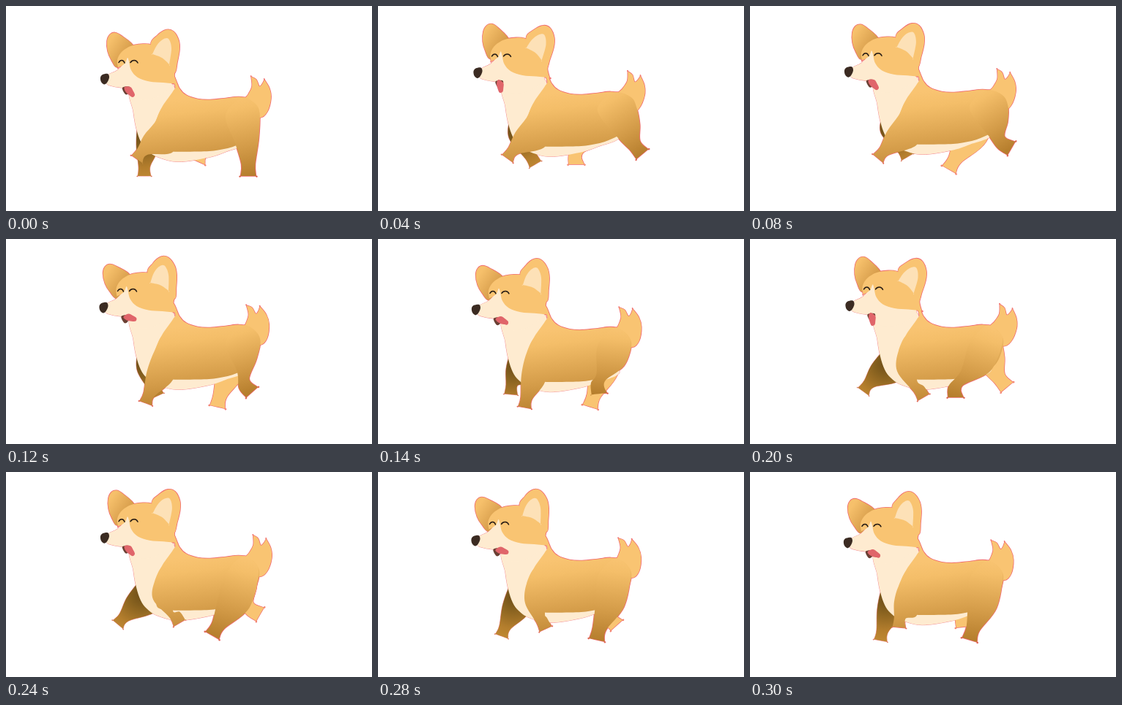
An HTML page with a canvas for the animation above (320 ms loop, 500 px wide and 281 px high).

```html
<!DOCTYPE html>
<html lang="en">
<head>
<meta charset="utf-8">
<title>Walking corgi</title>
<style>
  html, body { margin: 0; width: 100%; height: 100%; overflow: hidden; background: #fff; }
  canvas { display: block; }
</style>
</head>
<body>
<canvas id="stage" width="500" height="281"></canvas>
<script>
const ctx = document.getElementById('stage').getContext('2d');
const LOOP = 320, STEP = 20;
const ORANGE = '#f9c472', CREAM = '#feebd0', DARK = '#3b2b22', PINK = '#f0686f';
const FUR = [[0, ORANGE], [.18, '#f4be69'], [.65, '#d39b48'], [1, '#b67e2d']];

// Paw keys: time, sole centre x and y, shin angle in degrees (positive points back).
const FRONT_STEPS = [
  [0, 179, 210, -35], [40, 177, 209, -36], [80, 175, 209, -40], [120, 191, 225, -20],
  [160, 211, 233, 0], [200, 237, 217, 30], [240, 237, 207, 30], [280, 229, 215, 25]
];
const HIND_STEPS = [
  [0, 331, 233, 0], [40, 361, 203, 40], [80, 357, 195, 60], [120, 336, 210, 42],
  [160, 272, 213, -24], [200, 281, 217, 0], [240, 282, 224, -30],
  [280, 299, 230, -13], [300, 300, 230, -17]
];

// Rest outlines as x, y pairs; a doubled point makes a corner.
const TAIL = [325,131, 331,121, 336,110, 335,97, 335,97, 342,101, 346,110, 350,107,
  353,101, 353,101, 360,113, 362,127, 357,145, 347,153, 335,145];
const CHEST = [171,112, 174,145, 178,168, 184,186, 192,197, 206,206.5, 235,213.5,
  275,208, 300,200, 330,186, 300,160, 240,125, 222,105];
const BODY = [222,88, 230,97, 237,113, 246,122, 262,127.5, 279,128.5, 300,126.5, 318,124.5,
  332,128, 343,138, 346,152, 336,178, 315,191, 290,197.5, 262,199.5, 212,198, 205,184,
  203,170, 206,154, 214,137, 228,117, 231,109];
const EAR_FAR = [152,84, 144,74, 139,62, 138,48, 142,39, 149,36.5, 158,41, 174,55, 165,70];
const EAR_NEAR = [198,54, 207,40, 219,32.5, 229,35, 236,47, 237,60, 234,77, 230,92, 215,85];
const EAR_INNER = [200,66, 200,66, 206,54, 214,46, 222,45, 226,58, 223,80, 223,80, 213,71];
const FACE = [139,95, 152,88, 163,76, 167,69, 185,72, 210,95, 226,106, 214,120, 195,128,
  174,126, 171,113, 171,113, 158,112, 146,110, 137,106];
const CAP = [153,84.5, 153,84.5, 152,74, 157,64, 166,57, 175,53.5, 187,52, 199,53, 215,60,
  231,80, 230,95, 233,107, 233,107, 215,105, 196,103.5, 180,98, 171,88, 168,76, 166,71,
  163,78, 158,82];
const NOSE = [129,98, 132,94, 139,93, 141,98, 138,105, 134,107.5, 130,104];
const MOUTH = [159,112, 169,111, 168,119, 163,121];
const TONGUE = [162,111, 170,111, 174,117, 176,122, 173,125, 168,122, 163,117];

// Cyclic cubic interpolation through unevenly spaced keys.
function track(keys, time) {
  const t = time % LOOP, n = keys.length;
  const i = keys.findLastIndex(key => key[0] <= t);
  const [a, b, c, d] = [-1, 0, 1, 2].map(step => {
    const j = i + step, [at, ...values] = keys[(j + n) % n];
    return { at: at + Math.floor(j / n) * LOOP, values };
  });
  const span = c.at - b.at, u = (t - b.at) / span, u2 = u * u, u3 = u2 * u;
  return b.values.map((from, k) => {
    const to = c.values[k];
    const m0 = (to - a.values[k]) / (c.at - a.at) * span;
    const m1 = (d.values[k] - from) / (d.at - b.at) * span;
    return (2 * u3 - 3 * u2 + 1) * from + (u3 - 2 * u2 + u) * m0
         + (3 * u2 - 2 * u3) * to + (u3 - u2) * m1;
  });
}

function place(flat, dx, dy, angle = 0, px = 0, py = 0) {
  const c = Math.cos(angle), s = Math.sin(angle), out = [];
  for (let i = 0; i < flat.length; i += 2) {
    const x = flat[i] - px, y = flat[i + 1] - py;
    out.push(px + x * c - y * s + dx, py + x * s + y * c + dy);
  }
  return out;
}

function smooth(flat) {
  const path = new Path2D(), n = flat.length / 2;
  const at = i => { const k = (i + n) % n * 2; return [flat[k], flat[k + 1]]; };
  path.moveTo(...at(0));
  for (let i = 0; i < n; i++) {
    const [x0, y0] = at(i - 1), [x1, y1] = at(i), [x2, y2] = at(i + 1), [x3, y3] = at(i + 2);
    path.bezierCurveTo(x1 + (x2 - x0) / 6, y1 + (y2 - y0) / 6,
      x2 - (x3 - x1) / 6, y2 - (y3 - y1) / 6, x2, y2);
  }
  path.closePath();
  return path;
}

const between = (p, q, dx, dy) => [(p[0] + q[0]) / 2 + dx, (p[1] + q[1]) / 2 + dy];

// Sole and ankle corners of a paw seen from the side.
function paw([x, y, degrees], half, length) {
  const angle = degrees * Math.PI / 180, c = Math.cos(angle), s = Math.sin(angle);
  const corner = (along, up) => [x + along * c - up * s, y - along * s - up * c];
  return {
    toe: corner(-half, 0), heel: corner(half, 0),
    shin: corner(1 - half, length), calf: corner(half - 1, length)
  };
}

function frontLeg(time, by, shift = 0) {
  const { toe, heel, shin, calf } = paw(track(FRONT_STEPS, time), 9, 13);
  const shoulder = [203, 160 + by];
  const knee = between(shoulder, shin, -3 - Math.max(0, shin[0] - 205) / 2, 0);
  const outline = [[216, 139 + by], shoulder, knee, shin, toe, toe, heel, heel, calf,
    [228, 200 + by], [232, 168 + by]];
  return smooth(place(outline.flat(), shift, 0));
}

function hindLeg(time, by, shift = 0) {
  const foot = track(HIND_STEPS, time), x = foot[0];
  const { toe, heel, shin, calf } = paw(foot, 10.5, 16);
  const reach = Math.max(0, 331 - x);
  const rump = [345 + Math.max(0, x - 325) * .24, 146 + by * .8];
  const thigh = between(rump, calf, 2 + reach * .18, reach * .2);
  const groin = [313 + (x - 331) / 2, 188 + by];
  const outline = [[300, 150 + by], [322, 126 + by], [rump[0] - 8, 132 + by], rump, thigh,
    calf, heel, heel, toe, toe, shin, groin];
  return smooth(place(outline.flat(), shift, 0));
}

function shade(gradient, stops) {
  for (const [at, color] of stops) gradient.addColorStop(at, color);
  return gradient;
}

function draw(time) {
  const p = time % (LOOP / 2) / (LOOP / 2), opposite = time + LOOP / 2;
  const by = -10 * Math.sin(Math.PI * p);
  const hx = 1.5 * Math.sin(2 * Math.PI * p);
  const hy = -10 * Math.sin(Math.PI * p ** .8);
  const sway = .14 * Math.sin(2 * Math.PI * p ** 1.2);
  const lick = .58 * Math.sin(2 * Math.PI * p);

  const head = flat => smooth(place(flat, hx, hy));
  const ear = (flat, px, py) => smooth(place(flat, hx, hy, sway, px, py));

  const [footX, footY] = track(HIND_STEPS, time);
  const coat = shade(ctx.createLinearGradient(278, 122 + by, 292, 234 + by / 2), FUR);
  const haunch = shade(ctx.createLinearGradient(308, 122 + by, footX, footY), FUR);
  const shadow = shade(ctx.createRadialGradient(186, 178 + by, 0, 186, 178 + by, 58),
    [[0, '#6d4d18'], [.3, '#87611f'], [.75, '#b47e2d'], [1, '#bf8833']]);
  const earBack = shade(ctx.createLinearGradient(142 + hx, 48 + hy, 168 + hx, 66 + hy),
    [[0, '#f6c06b'], [1, '#d59b49']]);

  // Each part: path, fill, outline width.
  const outer = [
    [smooth(place(TAIL, 0, by, sway, 340, 145)), ORANGE, 1.5],
    [hindLeg(opposite, by, -10), ORANGE, 1.4],
    [frontLeg(opposite, by, -22), shadow, .8],
    [smooth(place(CHEST, 0, by)), CREAM, .8],
    [smooth(place(BODY, 0, by)), coat, 1.6],
    [hindLeg(time, by), haunch, 1.5],
    [frontLeg(time, by), coat, 1.2],
    [ear(EAR_FAR, 176, 80), earBack, 1.6],
    [head(FACE), CREAM, .8],
    [ear(EAR_NEAR, 200, 75), ORANGE, 1.6],
    [head(CAP), ORANGE, 1.6]
  ];
  const details = [
    [ear(EAR_INNER, 200, 75), '#fde1b7'],
    [head(NOSE), DARK],
    [head(MOUTH), '#6b4034'],
    [smooth(place(TONGUE, hx, hy, lick, 165, 112)), '#e0656a']
  ];

  ctx.fillStyle = '#fff';
  ctx.fillRect(0, 0, 500, 281);
  ctx.lineJoin = ctx.lineCap = 'round';
  ctx.strokeStyle = PINK;
  for (const [path, , width] of outer) {
    ctx.lineWidth = width;
    ctx.stroke(path);
  }
  for (const [path, fill] of [...outer, ...details]) {
    ctx.fillStyle = fill;
    ctx.fill(path);
  }

  ctx.strokeStyle = '#261b14';
  ctx.lineWidth = 1.5;
  for (const [x, w] of [[154, 8], [170, 10]]) {
    const left = x + hx, y = 77.5 + hy;
    ctx.beginPath();
    ctx.moveTo(left, y);
    ctx.bezierCurveTo(left + w * .25, y - 4, left + w * .8, y - 4, left + w, y + .5);
    ctx.stroke();
  }
}

function frame() {
  draw(Math.floor(performance.now() % LOOP / STEP) * STEP);
  requestAnimationFrame(frame);
}
frame();
</script>
</body>
</html>
```
